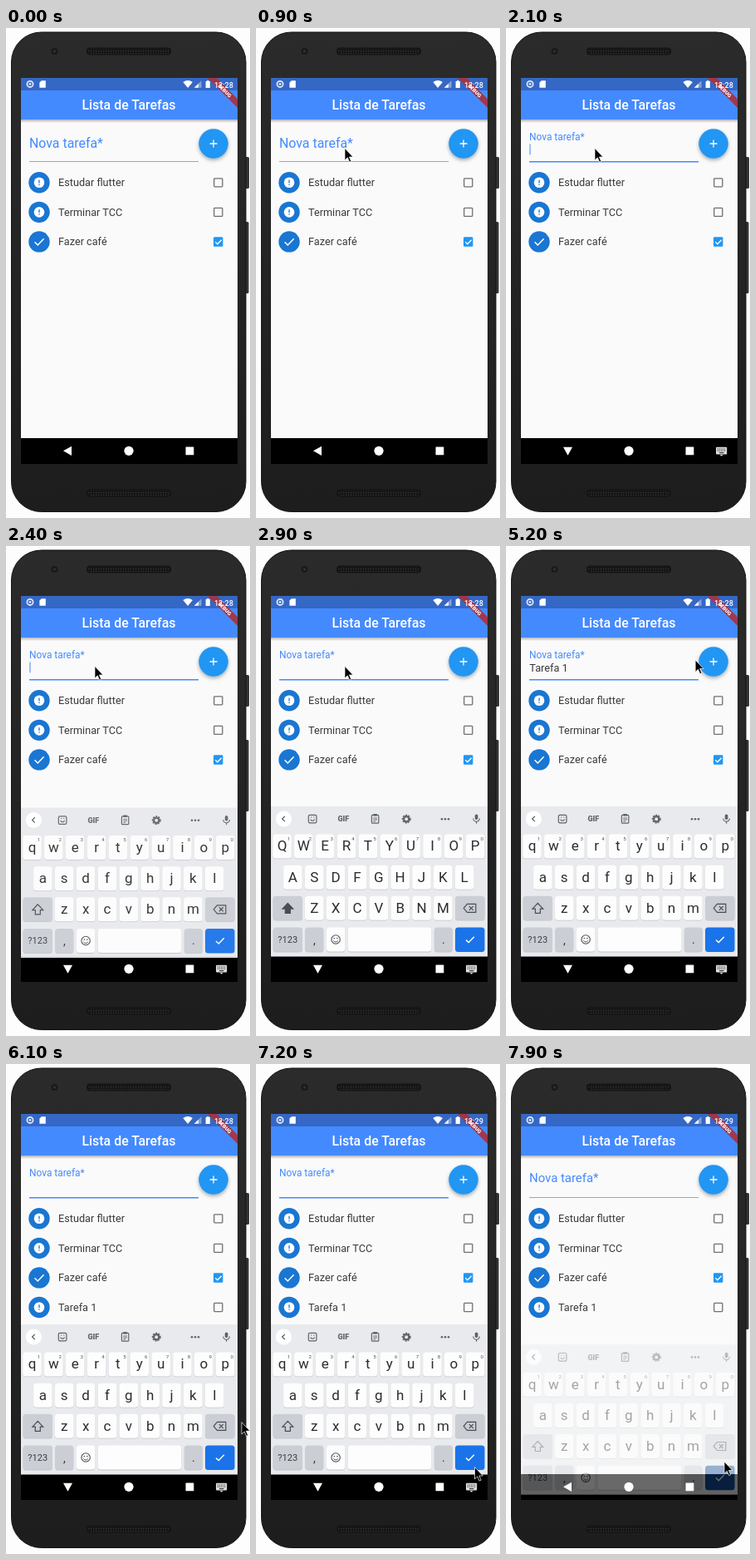
An HTML page for the animation above (8000 ms loop, 294 by 589 pixels).

```html
<!DOCTYPE html>
<html lang="pt">
<head>
<meta charset="utf-8">
<title>Lista de Tarefas</title>
<style>
html, body { margin: 0; width: 100%; height: 100%; overflow: hidden; background: #fdfdfd; }
svg { display: block; width: 100vw; height: 100vh; font-family: Roboto, "Noto Sans", sans-serif; }
</style>
</head>
<body>
<svg id="stage" viewBox="0 0 294 589"></svg>
<script>
const LOOP = 8000;
const BLUE = '#448aff';

const rect = (x, y, w, h, fill, r = 0, more = '') =>
  `<rect x="${x}" y="${y}" width="${w}" height="${h}" rx="${r}" fill="${fill}" ${more}/>`;
const circle = (x, y, r, fill, more = '') =>
  `<circle cx="${x}" cy="${y}" r="${r}" fill="${fill}" ${more}/>`;
const path = (d, fill, more = '') => `<path d="${d}" fill="${fill}" ${more}/>`;
const line = (d, stroke, w = 1.2, more = '') =>
  path(d, 'none', `stroke="${stroke}" stroke-width="${w}" ${more}`);
const text = (x, y, size, fill, s, more = '') =>
  `<text x="${x}" y="${y}" font-size="${size}" fill="${fill}" ${more}>${s}</text>`;
const group = (id, body, more = '') => `<g id="${id}" ${more}>${body}</g>`;
const MID = 'text-anchor="middle"';

function phone() {
  return rect(288, 155, 5, 38, '#333', 1.5) + rect(288, 233, 4.5, 86, '#333', 1.5) +
    rect(6.5, 5, 282.5, 576.5, 'url(#body)', 36, 'stroke="#151515"') +
    rect(97, 23.5, 102, 9, '#151515', 4) + rect(99, 25, 98, 6, 'url(#mesh)', 3) +
    rect(97, 554.5, 102, 9, '#151515', 4) + rect(99, 556, 98, 6, 'url(#mesh)', 3) +
    circle(58.5, 28, 4, '#1a1a1a') + circle(58.5, 28, 1.6, '#333');
}

function statusBar() {
  return rect(18, 60, 261, 15, '#3567c4') +
    circle(29, 67.4, 3.6, 'none', 'stroke="#dfe8f8" stroke-width="1.8"') + circle(29, 67.4, 1.4, '#dfe8f8') +
    path('M42.8 63.2h5v8.6h-7.4v-6.2z', '#fff') +
    path('M213.3 65q5.8-4.2 11.6 0l-5.8 7z', '#fff') +
    path('M235.5 63.2v8.6h-8.8z', '#fff', 'opacity=".4"') + path('M231.8 67v4.8h-5z', '#fff') +
    path('M240.6 64h1.4v-1h2.4v1h1.4v8h-5.2z', '#fff');
}

function banner() {
  return `<g transform="translate(279 60) rotate(45)">${rect(-30, 17.8, 60, 7.6, '#a8323f', 0, 'opacity=".93"')}` +
    text(0, 24, 6.2, '#fff', 'DEBUG', MID + ' font-weight="900"') + '</g>';
}

function task(i, label, done) {
  const y = 185.8 + i * 35.55;
  const icon = done
    ? line(`M34.6 ${y + .3}l3.6 3.7 7.4-7.6`, '#fff', 1.5)
    : circle(40, y, 6.3, '#fff') + rect(39.35, y - 3.2, 1.3, 3.9, '#1976d2') + rect(39.35, y + 1.9, 1.3, 1.3, '#1976d2');
  const box = done
    ? rect(250, y - 5.6, 11.4, 11.4, '#2196f3', 1.2) + line(`M252.2 ${y + .2}l2.6 2.6 4.8-5`, '#fff', 1.3)
    : rect(250.7, y - 5, 10.1, 10.1, 'none', .8, 'stroke="#707070" stroke-width="1.3"');
  return circle(40, y, 12.7, '#1976d2') + icon + text(63, y + 4.5, 12.7, '#3a3a3a', label) + box;
}

function app() {
  return rect(18, 60, 261, 433, '#fafafa') +
    rect(18, 110, 261, 4, 'url(#drop)') + rect(18, 75, 261, 35, BLUE) +
    text(148, 98.2, 15.9, '#fff', 'Lista de Tarefas', MID + ' font-weight="500"') +
    statusBar() + banner() + group('clock', text(251, 71.6, 9, '#fff', '', 'id="time" font-weight="500"')) +
    text(28, 0, 15.9, BLUE, 'Nova tarefa*', 'id="label"') +
    rect(28, 160, 204, 1, '#a5a5a5', 0, 'id="rule"') +
    text(28.3, 150.6, 12.7, '#383838', '', 'id="entry" xml:space="preserve"') +
    rect(28, 152, 0, .9, '#444', 0, 'id="compose"') +
    rect(28.4, 139.5, 1.2, 12.8, '#5b9cf5', 0, 'id="caret"') +
    circle(250, 139, 17.8, '#2196f3', 'filter="url(#lift)"') +
    circle(250, 139, 17.8, '#fff', 'id="ripple"') +
    line('M245.6 139h8.9M250 134.6v8.9', '#fff', 1.3) +
    task(0, 'Estudar flutter') + task(1, 'Terminar TCC') + task(2, 'Fazer café', true) +
    group('added', task(3, 'Tarefa 1'));
}

const key = (x, y, w, fill) =>
  rect(x, y + .8, w, 29, '#c3c6ca', 3.5) + rect(x, y, w, 29, fill, 3.5);

function letters(row, x, y) {
  return [...row].map((c, i) => {
    const cx = x + i * 25.85;
    return key(cx - 11.3, y - 14.5, 22.6, '#fdfdfd') + text(cx, y + 5.4, 17, '#2c2c2c', c, MID + ' class="letter"');
  }).join('');
}

function toolbar() {
  const ink = '#5f6368';
  const teeth = 'stroke-dasharray="2.1 1.3"';
  return rect(63.3, 323.3, 9.6, 9.6, 'none', 1.6, `stroke="${ink}" stroke-width="1.2"`) +
    line('M65.5 328.6q2.6 3.4 5.2 0M66 326h1.2M69.2 326h1.2', ink, 1.1) +
    text(105.3, 331.4, 9, ink, 'GIF', MID + ' font-weight="900"') +
    rect(139.4, 323.4, 8.4, 9.8, 'none', 1, `stroke="${ink}" stroke-width="1.2"`) +
    rect(141.4, 322, 4.4, 2.6, ink) + line('M141.2 327h4.8M141.2 329h4.8M141.2 331h3', ink, .9) +
    circle(181.2, 328.2, 3.1, 'none', `stroke="${ink}" stroke-width="2.2"`) +
    circle(181.2, 328.2, 4.7, 'none', `stroke="${ink}" stroke-width="1.5" ${teeth}`) +
    [-4, 0, 4].map(d => circle(228 + d, 328.2, 1.3, ink)).join('');
}

function keyboard() {
  const grey = '#cbced4', ink = '#4a4d52';
  const digits = [...'1234567890'].map((d, i) =>
    text(39.5 + i * 25.85, 354, 6.2, '#555', d, MID)).join('');
  return rect(18, 313, 261, 180.5, '#e8eaed') +
    circle(33.4, 328, 9.6, '#fff') + line('', '#55585d', 1.2, 'id="chevron"') +
    group('tools', toolbar()) +
    group('hints', [75, 147, 219.5].map(x => text(x, 332, 11.3, '#4a4d52', '', MID)).join('') +
      line('M109.5 321v14M183 321v14', '#c4c7cb', .9)) +
    rect(263.8, 322.5, 3.6, 6.6, '#5f6368', 1.8) + line('M261.8 327.5a3.8 3.8 0 0 0 7.6 0M265.6 331.2v2.6', '#5f6368', 1.1) +
    letters('qwertyuiop', 31.5, 361) + digits + letters('asdfghjkl', 44.4, 398.3) +
    key(20.5, 420.7, 35.5, grey) +
    path('M38.3 429.3l-6.4 6.8h3.4v5.2h6v-5.2h3.4z', 'none', `id="shift" stroke="${ink}" stroke-width="1.2"`) +
    letters('zxcvbnm', 70.3, 435.3) + key(240, 420.7, 35.5, grey) +
    path('M250.2 435.3l4.2-5h10.4v10h-10.4z', 'none', `stroke="${ink}" stroke-width="1.2"`) +
    line('M256.8 432.8l5 5M261.8 432.8l-5 5', ink) +
    key(20.5, 458.6, 35.5, grey) + text(38.2, 477, 11, '#3a3d42', '?123', MID) +
    key(59.3, 458.6, 22, grey) + text(70.3, 478.5, 14, '#333', ',', MID) +
    key(85, 458.6, 22.2, '#fdfdfd') + circle(96.1, 473, 5.2, 'none', `stroke="${ink}" stroke-width="1.1"`) +
    circle(94.3, 471.6, .8, ink) + circle(97.9, 471.6, .8, ink) + line('M93.3 474.4q2.8 3.2 5.6 0', ink, 1) +
    key(110.8, 458.6, 100.4, '#fdfdfd') +
    key(214.8, 458.6, 22, grey) + text(225.8, 477.5, 14, '#333', '.', MID) +
    rect(240, 458.6, 35.5, 29.5, '#1a73e8', 3.5, 'id="enter"') + line('M253 473.4l3.2 3.2 6.6-6.8', '#fff', 1.4);
}

function navIcons() {
  return path('', '#fff', 'id="back"') + circle(148, 508.3, 5.6, '#fff') + rect(216.5, 503.5, 9.8, 9.8, '#fff', .6) +
    group('imeIcon', rect(253, 503.8, 13.2, 8.6, '#ddd', 1) +
      line('M254.6 506h10.2M254.6 508.2h10.2', '#222', 1, 'stroke-dasharray="1.2 .9"') +
      line('M257 510.6h5.4', '#222', 1) + path('M257.6 513h4l-2 1.8z', '#ddd'));
}

const stage = document.getElementById('stage');
stage.innerHTML = `<defs>
  <linearGradient id="body" x2="0" y2="1"><stop stop-color="#2b2b2b"/><stop offset="1" stop-color="#1d1d1d"/></linearGradient>
  <linearGradient id="drop" x2="0" y2="1"><stop stop-color="#000" stop-opacity=".28"/><stop offset="1" stop-color="#000" stop-opacity="0"/></linearGradient>
  <pattern id="mesh" width="3" height="3" patternUnits="userSpaceOnUse">${rect(0, 0, 1.2, 1.2, '#3a3a3a')}</pattern>
  <filter id="lift" x="-30%" y="-30%" width="160%" height="170%"><feDropShadow dx="0" dy="2.2" stdDeviation="2" flood-opacity=".32"/></filter>
  <clipPath id="screen">${rect(18, 60, 261, 464, '#000')}</clipPath>
</defs>` + phone() +
  `<g clip-path="url(#screen)">${rect(18, 60, 261, 464, '#000')}${app()}${group('keys', keyboard())}${navIcons()}</g>` +
  path('M0 0V14.4L3.3 11.3L5.6 16.6L7.7 15.7L5.4 10.5H9.9Z', '#000', 'id="mouse" stroke="#fff" stroke-width=".7"');

const $ = id => document.getElementById(id);
const set = (id, attrs) => { for (const k in attrs) $(id).setAttribute(k, attrs[k]); };
const show = (id, on) => { $(id).style.display = on ? '' : 'none'; };
const allLetters = [...document.querySelectorAll('.letter')];
const hintTexts = [...$('hints').querySelectorAll('text')];

// Linear interpolation over [time, value, value...] rows.
function track(rows, t) {
  let i = rows.findIndex(r => r[0] > t);
  if (i < 0) i = rows.length;
  if (i === 0) return rows[0].slice(1);
  const a = rows[i - 1], b = rows[i] || a;
  const p = b === a ? 0 : (t - a[0]) / (b[0] - a[0]);
  return a.slice(1).map((v, j) => v + (b[j + 1] - v) * p);
}

const MOUSE = [[200, 25, 0], [400, 48, 48], [600, 88, 116], [800, 104, 140], [900, 107, 144.5],
  [4950, 107, 144.5], [5100, 180, 139], [5200, 228, 137], [5300, 243, 139], [5400, 247, 143],
  [5700, 247, 143], [5800, 260, 185], [5900, 277, 270], [6000, 285, 350], [6100, 284, 430],
  [6200, 279, 490], [6300, 272, 512], [6400, 269, 513], [6500, 268, 508], [6600, 264.5, 497],
  [6750, 264.5, 497], [6900, 264, 488], [7000, 263.5, 484.5], [7450, 263.5, 484.5], [7600, 263, 478]];
const FLOAT = [[1850, 0], [1900, .2], [2000, .75], [2070, 1], [7750, 1], [7800, .8], [7900, .25], [7980, 0]];
const SLIDE = [[2250, 18, 0], [2300, 7, .65], [2400, 1.5, .94], [2500, 0, 1],
  [7750, 0, 1], [7800, 5, .88], [7900, 24, .42], [8000, 42, 0]];
const TYPED = 'Tarefa 1';
const STROKES = [3000, 3300, 3600, 3900, 4100, 4300, 4400, 4500];
const HINTS = [[3100, 'T The Todas'], [3400, 'Ta Tarefa That'], [3900, 'Tar Tarefa That'],
  [4000, 'Tare Tarefa Tared'], [4200, 'Taref Tarefa Tare'], [4400, 'Tarefa Tarefas Tare'], [4700, '']];
const CARET = [[2000, 2600], [3000, 5000], [5600, 6100], [6600, 7200]];

function draw(t) {
  const s = t + 30;
  const within = (a, b) => s >= a && s < b;
  const focused = within(1900, 7800);

  const f = track(FLOAT, t)[0];
  set('label', { transform: `translate(${28 * .25 * f} 0) scale(${1 - .25 * f})`, y: (144.2 - 9.4 * f) / (1 - .25 * f) });
  set('rule', focused ? { height: 1.5, fill: BLUE } : { height: 1, fill: '#a5a5a5' });

  const n = s < 5600 ? STROKES.filter(k => s >= k).length : 0;
  const entry = $('entry');
  const value = TYPED.slice(0, n);
  if (entry.textContent !== value) entry.textContent = value;
  const width = n ? entry.getComputedTextLength() : 0;
  set('compose', { width: n < 7 ? width : 0 });
  set('caret', { x: 28.4 + width });
  show('caret', CARET.some(c => within(...c)));

  const p = (t - 5580) / 420;
  const pressed = p > 0 && p < 1;
  set('ripple', { r: pressed ? 17.8 * Math.min(1, .4 + p) : 0, opacity: pressed ? .25 * (1 - p) : 0 });
  show('added', s >= 5700);
  $('time').textContent = s < 6500 ? '12:28' : '12:29';

  const [dy, alpha] = track(SLIDE, t);
  show('keys', within(2300, 8100));
  set('keys', { transform: `translate(0 ${dy})`, opacity: alpha });
  const upper = within(2900, 3100);
  for (const el of allLetters) {
    const c = el.textContent;
    el.textContent = upper ? c.toUpperCase() : c.toLowerCase();
  }
  set('shift', { fill: upper ? '#4a4d52' : 'none' });
  const hint = HINTS.filter(h => s >= h[0]).pop();
  const words = hint && hint[1] ? hint[1].split(' ') : null;
  show('tools', !words);
  show('hints', words);
  if (words) hintTexts.forEach((el, i) => { el.textContent = words[i]; });
  set('chevron', { d: words ? 'M32 324.8l3.2 3.2-3.2 3.2' : 'M34.8 324.8l-3.2 3.2 3.2 3.2' });
  set('enter', { fill: within(7600, 8100) ? '#114a96' : '#1a73e8' });

  set('back', { d: focused ? 'M69 503.8h11l-5.5 10z' : 'M69 508.3l10-5.6v11.2z' });
  show('imeIcon', focused);

  const [mx, my] = track(MOUSE, t);
  show('mouse', s >= 200);
  set('mouse', { transform: `translate(${mx} ${my})` });
}

const start = performance.now();
function tick() {
  draw((performance.now() - start) % LOOP);
  requestAnimationFrame(tick);
}
draw(0);
requestAnimationFrame(tick);
</script>
</body>
</html>
```
